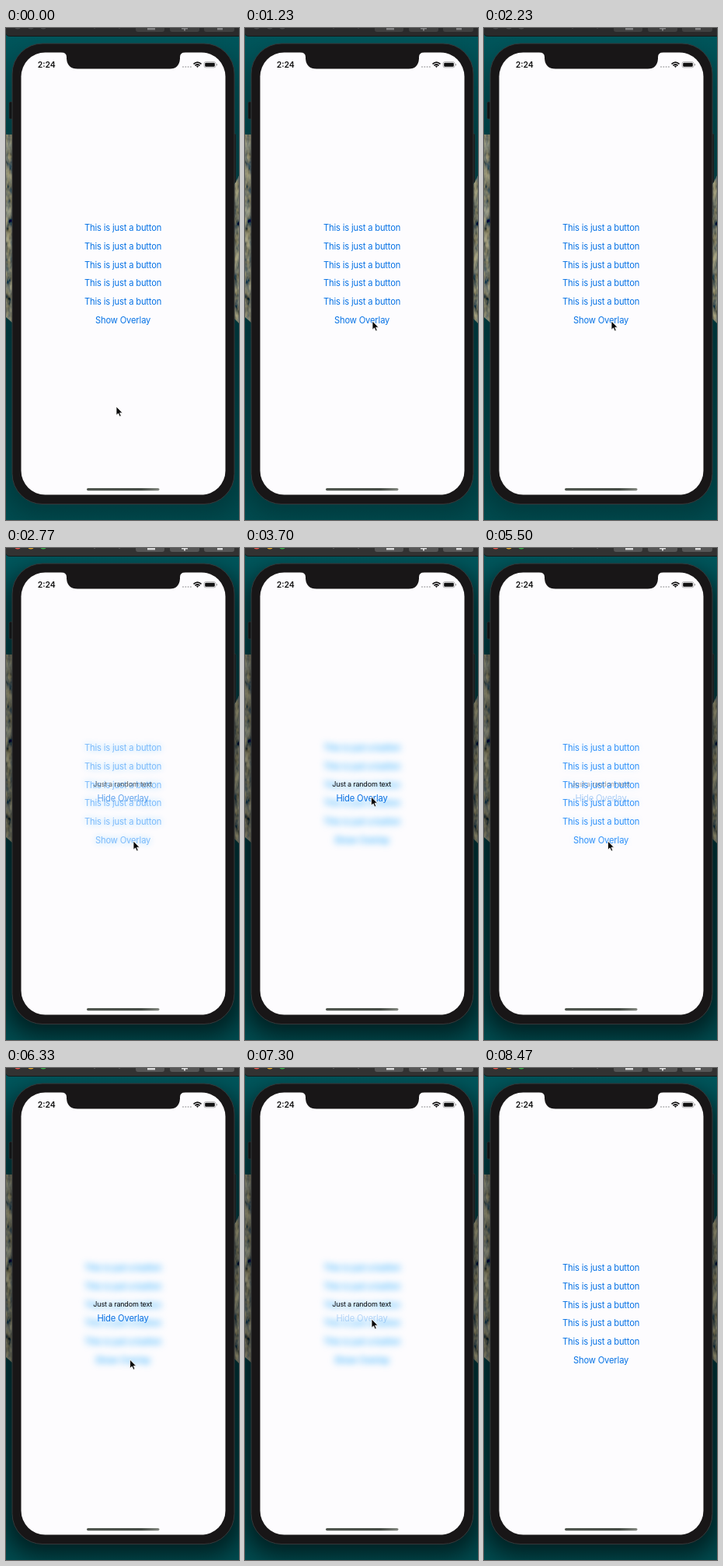
Animation of 300 by 633 pixels, one loop 8.56 s. Source, as an HTML page:

```html
<!DOCTYPE html>
<html lang="en">
<head>
<meta charset="utf-8">
<title>Blur overlay</title>
<style>
  html, body { margin: 0; width: 100%; height: 100%; overflow: hidden; background: #00484c; }
  svg { display: block; width: 300px; height: 633px; }
  text { font-family: Inter, Roboto, sans-serif; text-anchor: middle; }
  .button { font-size: 11.2px; letter-spacing: -.17px; }
  #blurred { fill: #12a4ff; filter: blur(4.3px); }
</style>
</head>
<body>
<svg viewBox="0 0 300 633">
  <defs>
    <linearGradient id="teal" x2="0" y2="1">
      <stop offset="0" stop-color="#00575d"/>
      <stop offset=".2" stop-color="#00484d"/>
      <stop offset=".62" stop-color="#003c41"/>
      <stop offset="1" stop-color="#004b4f"/>
    </linearGradient>
    <linearGradient id="home">
      <stop offset="0" stop-color="#50564f"/>
      <stop offset=".75" stop-color="#454b45"/>
      <stop offset="1" stop-color="#858982"/>
    </linearGradient>
    <filter id="rock" x="0" y="0" width="1" height="1">
      <feTurbulence type="fractalNoise" baseFrequency=".16 .07" numOctaves="3" seed="4"/>
      <feColorMatrix values="1 0 0 0 -.28  .85 .1 0 0 -.24  .4 .2 0 0 -.13  0 0 0 0 1"/>
      <feComposite in2="SourceGraphic" operator="in"/>
    </filter>
    <filter id="soft" x="-30%" y="-30%" width="160%" height="160%"><feGaussianBlur stdDeviation="14"/></filter>
  </defs>

  <rect width="300" height="633" fill="url(#teal)"/>
  <path d="M0 137H9V380L0 372ZM292 205L300 190V380L292 372Z" filter="url(#rock)"/>
  <rect id="shadow" x="0" y="30" width="302" height="598" rx="42" filter="url(#soft)"/>

  <path d="M0 0H300V11H5Q1 11 0 8Z" fill="#151718"/>
  <path id="bar" d="M0 0H300V10H5Q1 10 0 7Z"/>
  <g id="lights"><circle cx="15" cy="-3" r="4.5"/><circle cx="32" cy="-3" r="4.5"/><circle cx="48" cy="-3" r="4.5"/></g>
  <g id="tools">
    <path d="M167 0H204V2Q204 5 201 5H170Q167 5 167 2ZM211 0H249V2Q249 5 246 5H214Q211 5 211 2ZM255 0H294V2Q294 5 291 5H258Q255 5 255 2Z" fill="#565656"/>
    <path d="M182 0H192V2.6H182ZM226 0H234V1.4H231V3.6H229V1.4H226ZM272 0H279V2.6H272Z" fill="#d8d8d8"/>
    <path d="M114 0V1M146 0V1" stroke="#777"/>
  </g>

  <g fill="#111415" stroke="#30383a" stroke-width=".6">
    <rect x="4" y="95" width="6" height="22" rx="1.5"/>
    <rect x="290" y="136" width="6" height="63" rx="1.5"/>
  </g>
  <rect x="8" y="20" width="286" height="592.5" rx="39" fill="#181617" stroke="#36393b"/>
  <rect x="19.5" y="31.5" width="263" height="569" rx="31" fill="#fdfcfe"/>
  <path d="M71 31Q78 31.5 78 37.5V39.5Q79 52.5 92 52.5H211Q223 52.5 224 39.5V37.5Q224 31.5 231 31Z" fill="#181617"/>

  <text x="52.2" y="51" font-size="10.4" font-weight="600" fill="#111">2:24</text>
  <g fill="#b5b5b7"><circle cx="228" cy="50" r="1"/><circle cx="231.3" cy="50" r="1"/><circle cx="234.6" cy="50" r="1"/><circle cx="237.9" cy="50" r="1"/></g>
  <g fill="none" stroke="#111" stroke-width="1.7">
    <path d="M241.5 46.3Q246.5 41.8 251.5 46.3M243.4 48.4Q246.5 45.6 249.6 48.4"/>
    <path d="M244.9 49.2Q246.5 48 248.1 49.2L246.5 51Z" fill="#111" stroke="none"/>
    <rect x="255" y="43.5" width="15" height="7.4" rx="2.2" stroke="#999" stroke-width=".7"/>
    <rect x="256.2" y="44.7" width="12.6" height="5" rx="1.2" fill="#111" stroke="none"/>
    <path d="M271.5 46V48.4" stroke="#999" stroke-width="1"/>
  </g>
  <rect x="104" y="592" width="93.5" height="3.2" rx="1.6" fill="url(#home)"/>

  <g id="blurred" class="button"></g>
  <g id="sharp" class="button"></g>
  <g id="overlay">
    <text x="150.2" y="307" font-size="9" letter-spacing="-.2" fill="#080808">Just a random text</text>
    <text id="hide" class="button" x="150.5" y="326" fill="#0a70e2">Hide Overlay</text>
  </g>
  <path id="cursor" d="M0 0V11.2L2.6 8.9L4.4 13L6.3 12.2L4.6 8.2H8Z" fill="#080808" stroke="#fff" stroke-width=".8"/>
</svg>
<script>
const LOOP = 8560, FADE = 500, FOCUS = 2400;
const $ = id => document.getElementById(id);
const clamp = x => Math.min(1, Math.max(0, x));
const ease = x => x * x * (3 - 2 * x);
const ramp = (t, start, length) => ease(clamp((t - start) / length));

// Each move: start, end, target x, target y
const moves = [
  [60, 860, 164, 377],
  [3000, 3440, 162.5, 320],
  [4720, 5180, 159.5, 377],
  [6250, 6980, 163, 323],
  [7900, 8190, 303, 150]
];

const labels = [...Array(5).fill('This is just a button'), 'Show Overlay'];
const rows = labels.map((label, i) =>
  `<text x="150.6" y="${260.8 + i * 23.85}">${label}</text>`).join('');
$('sharp').innerHTML = $('blurred').innerHTML = rows;
const show = $('sharp').lastElementChild;

// Opacity of a button that is held down and then recovers
const pressed = (t, down, up) => 1 - .75 * (ramp(t, down, 50) - ramp(t, up, 150));

function setFocus(on) {
  $('shadow').setAttribute('opacity', on ? .55 : .2);
  $('bar').setAttribute('fill', on ? '#323232' : '#2a2a2b');
  $('tools').setAttribute('opacity', on ? 1 : .5);
  const colors = on ? ['#e8554d', '#e0a52f', '#35b046'] : Array(3).fill('#48494a');
  [...$('lights').children].forEach((dot, i) => dot.setAttribute('fill', colors[i]));
}

function draw(now) {
  const t = now % LOOP;
  const p = ramp(t, 2480, FADE) - ramp(t, 4180, FADE)
          + ramp(t, 5310, FADE) - ramp(t, 7690, FADE);
  const glass = p ** 1.6;
  $('sharp').style.opacity = 1 - glass;
  $('sharp').style.fill = `hsl(211 95% ${46 + 14 * p}%)`;
  $('blurred').style.opacity = glass;
  $('overlay').style.opacity = p;
  show.style.opacity = pressed(t, FOCUS, 2460) * pressed(t, 5270, 5320);
  $('hide').style.opacity = pressed(t, 4060, 4400) * pressed(t, 6990, 7690);

  let x = 142, y = 487;
  for (const [start, end, toX, toY] of moves) {
    const k = ramp(t, start, end - start);
    x += (toX - x) * k;
    y += (toY - y) * k;
  }
  $('cursor').setAttribute('transform', `translate(${x} ${y})`);
  setFocus(t >= FOCUS);
  requestAnimationFrame(() => draw(performance.now() - begin));
}
const begin = performance.now();
draw(0);
</script>
</body>
</html>
```
